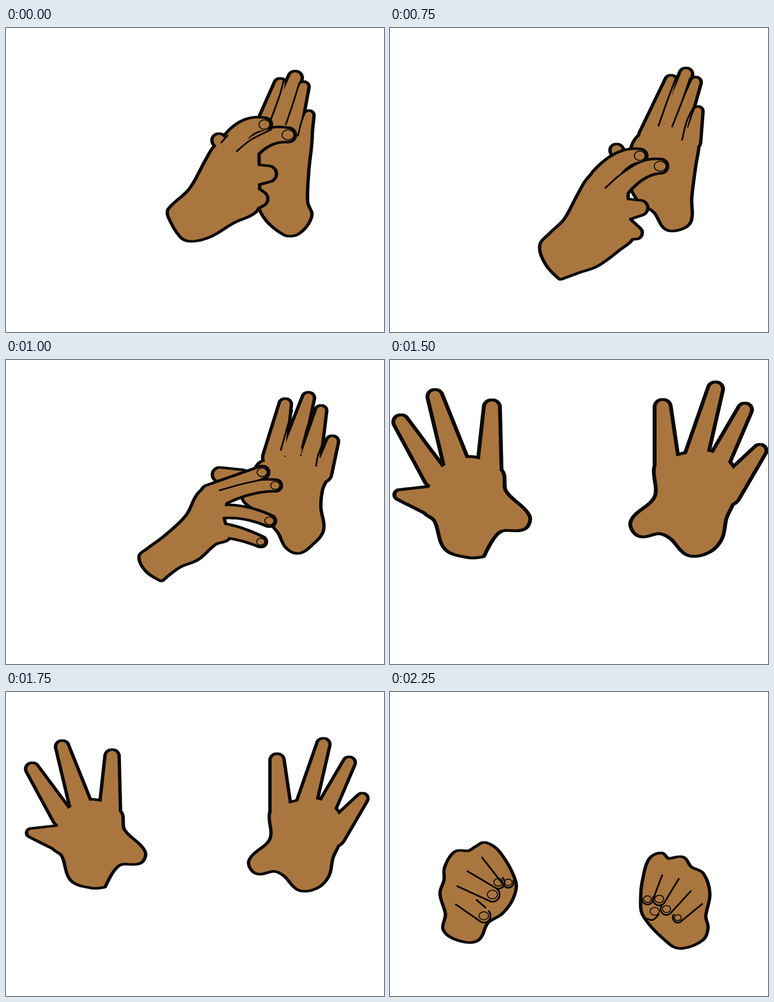
Animation, 834 px wide and 671 px high, one loop 2500 ms. Source, as an HTML page with a canvas:

```html
<!DOCTYPE html>
<html>
<head>
<meta charset="utf-8">
<style>
html, body { margin: 0; width: 100%; height: 100%; overflow: hidden; background: #fff; }
canvas { display: block; }
</style>
</head>
<body>
<canvas id="stage" width="834" height="671"></canvas>
<script>
const ctx = document.getElementById('stage').getContext('2d');
const SKIN = '#aa763f', INK = '#0c0a07', TAU = 2 * Math.PI;

// "x,y x,y!" to points; ! keeps a sharp corner.
const points = text => text.split(' ').map(word => {
  const [x, y] = word.split(',').map(parseFloat);
  return { x, y, sharp: word.endsWith('!') };
});

// Smooth curve through key points, with handles along the neighbours' chord.
function smooth(text, closed) {
  const pts = points(text), n = pts.length, path = new Path2D();
  const at = i => closed ? pts[(i + n) % n] : pts[Math.max(0, Math.min(n - 1, i))];
  const dir = i => {
    const a = at(i - 1), b = at(i + 1), d = Math.hypot(b.x - a.x, b.y - a.y) || 1;
    return at(i).sharp ? [0, 0] : [(b.x - a.x) / d, (b.y - a.y) / d];
  };
  path.moveTo(pts[0].x, pts[0].y);
  for (let i = 0; i < (closed ? n : n - 1); i++) {
    const p = at(i), q = at(i + 1), u = dir(i), v = dir(i + 1);
    const k = Math.hypot(q.x - p.x, q.y - p.y) / 3;
    path.bezierCurveTo(p.x + u[0] * k, p.y + u[1] * k, q.x - v[0] * k, q.y - v[1] * k, q.x, q.y);
  }
  if (closed) path.closePath();
  return path;
}

const skin = path => ({ skin: path });
const line = path => ({ line: path });
const palm = text => skin(smooth(text, true));
const creases = (...texts) => texts.map(text => line(smooth(text)));

function nail(x, y, r) {
  const path = new Path2D();
  path.ellipse(x, y, r, r * 0.85, 0, 0, TAU);
  return { nail: path };
}

// Tapered finger from base to tip, bent towards a middle point if given.
function finger(text, baseR, tipR) {
  const pts = points(text), a = pts[0], b = pts[pts.length - 1];
  const m = pts.length > 2 ? pts[1] : { x: (a.x + b.x) / 2, y: (a.y + b.y) / 2 };
  const path = new Path2D();
  for (let t = 0; t < 1.01; t += 1 / 32) {
    const mix = k => (1 - t) ** 2 * a[k] + 2 * t * (1 - t) * m[k] + t * t * b[k];
    const x = mix('x'), y = mix('y'), r = baseR + (tipR - baseR) * t;
    path.moveTo(x + r, y);
    path.arc(x, y, r, 0, TAU);
  }
  return skin(path);
}

function nailed(text, baseR, tipR) {
  const tip = points(text).pop();
  return [finger(text, baseR, tipR), nail(tip.x, tip.y, tipR)];
}

// Finger folded into a fist: one side line, then a turn round the tip.
function curl(text, r, side) {
  const [a, tip] = points(text), angle = Math.atan2(tip.y - a.y, tip.x - a.x);
  const path = new Path2D();
  path.moveTo(a.x, a.y);
  path.arc(tip.x, tip.y, r, angle + side * TAU / 4, angle - side * TAU / 5, side > 0);
  return [line(path), nail(tip.x, tip.y, r * 0.7)];
}

// Finger folded behind the hand, its tip hooking back to the left.
function hook(text) {
  const { x, y } = points(text).pop();
  const turn = `${x + 8},${y + 10} ${x + 3},${y + 21} ${x - 8},${y + 24} ${x - 22},${y + 23}`;
  return [line(smooth(text + ' ' + turn)), nail(x - 6, y + 11, 8)];
}

const hand = (...parts) => parts.flat();

const tapRight = hand(
  palm('556,215 660,215 672,225 664,320 662,385 671,415 645,451 615,454 565,405 540,300'),
  finger('580,210 605,124', 22, 10), finger('605,200 638,110', 18, 12),
  finger('632,210 656,130', 18, 9), finger('655,240 668,193', 16, 8),
  creases('613,115 604,148 584,203', '648,119 632,170 617,214', '660,184 651,210 644,239')
);
const tapLeft = hand(
  palm('490,245 545,250 555,300 555,375 550,403 500,428 450,458 410,468 388,460 361,415 362,400 408,356 445,290 463,262'),
  finger('480,260 470,248', 12, 12),
  nailed('502,252 530,210 570,213', 22, 12), nailed('530,275 570,230 622,236', 20, 13),
  finger('540,325 578,322', 22, 15), finger('530,375 560,377', 30, 14),
  creases('474,254 490,236', '508,273 540,247 587,223')
);
const slideRight = hand(
  palm('552,238 665,220 679,240 670,310 662,375 661,425 640,442 610,442 585,405 550,380 530,330'),
  finger('574,240 620,117', 22, 10), finger('612,215 653,102', 16, 11),
  finger('640,215 674,120', 16, 9), finger('665,250 679,184', 17, 8),
  creases('630,112 612,160 592,217', '662,110 645,160 622,219', '673,168 655,205 644,248')
);
const slideThumb = hand(finger('500,258 486,234', 13, 11));
const slideLeft = hand(
  palm('425,297 470,262 505,300 508,345 515,395 520,425 490,452 442,487 400,502 362,516! 333,485 320,445 340,420 373,388 402,335'),
  nailed('455,298 495,245 537,246', 24, 12), nailed('490,318 535,268 582,269', 20, 13),
  finger('500,365 537,361', 22, 14), finger('495,405 528,416', 25, 11),
  creases('460,318 490,291 525,267 552,255')
);
const liftRight = hand(
  palm('568,225 690,215 710,245 695,285 691,325 697,375 672,407 645,424 620,412 602,378 560,335 525,305 540,270'),
  finger('592,215 616,98', 22, 10), finger('632,200 667,84', 20, 10),
  finger('672,210 695,112', 20, 9), finger('698,250 720,180', 17, 10),
  creases('632,110 620,150 606,200', '678,113 664,150 652,196', '698,186 688,212 684,235')
);
const liftThumb = hand(finger('520,256 472,253', 11, 13));
const liftLeft = hand(
  palm('430,292 470,278 485,300 478,345 483,370 490,392 460,405 422,438 380,456 343,485! 312,465 297,435 312,420 350,392 400,345'),
  nailed('450,295 565,248', 17, 11), nailed('470,305 535,274 594,277', 15, 10),
  nailed('470,335 525,330 581,355', 12, 10), nailed('470,375 515,380 562,401', 13, 9),
  creases('470,288 520,274 575,262')
);
const partLeft = hand(
  palm('303,163! 330,164 362,170! 392,157 398,168 352,235 346,285 362,308 380,317 380,352 330,368 265,392 228,425! 188,395 185,372 240,328 270,295 268,265 288,260! 277,215! 302,215!'),
  finger('370,335 448,334', 20, 13),
  hook('362,169'), hook('285,210 334,226'), hook('287,258 324,272'), hook('253,311 303,325')
);
const partRight = hand(
  palm('572,230 557,280 535,294 520,325 550,330 590,350 617,365 630,385 642,413 675,403 702,380 708,325 722,285 715,240 670,210 620,208'),
  finger('560,313 464,297', 22, 14), finger('592,225 602,98', 20, 10),
  finger('650,215 687,88', 18, 11), finger('690,225 735,118', 19, 10), finger('710,270 772,199', 20, 9)
);
const openLeft = hand(
  palm('250,265 258,305 303,352 295,375 247,381 216,428! 190,430 146,414 126,360 104,340 112,300 140,256 195,240'),
  finger('118,322 56,311', 25, 7), finger('125,275 58,170', 20, 11),
  finger('165,250 124,121', 21, 11), finger('229,260 234,142', 20, 12)
);
const openRight = hand(
  palm('588,260 586,325 540,372 553,398 592,393 615,403 648,435 685,430 709,405 718,365 735,325 735,272 690,238 630,245'),
  finger('606,260 598,151', 20, 12), finger('660,255 700,116', 19, 11),
  finger('707,255 757,156', 17, 10), finger('722,315 786,235', 24, 9)
);
const fistLeft = hand(
  palm('210,335 240,356 274,420 268,455 245,487 213,508 193,545 160,548 122,526 126,490 114,445 123,415 124,388 145,355 175,353 192,343'),
  curl('202,364 261,420', 12, 1), curl('170,395 239,420', 14, 1),
  curl('147,428 226,447', 16, 1), curl('144,468 207,494', 15, 1), creases('190,458 212,477')
);
const fistRight = hand(
  palm('598,358 613,370 645,367 662,388 688,402 702,445 693,495 698,520 688,545 645,563 620,555 562,493 557,450 562,410 575,370'),
  curl('601,403 568,457', 12, -1), curl('638,411 594,457', 14, -1),
  curl('665,438 610,479', 13, -1), curl('690,467 635,498', 11, -1),
  nail(584,484, 10), creases('565,500 580,503 594,490')
);

function draw(parts, sx = 1, sy = 1, dx = 0, dy = 0) {
  const each = (kind, paint) => parts.forEach(part => part[kind] && paint(part[kind]));
  ctx.setTransform(sx, 0, 0, sy, dx, dy);
  // Broad nib: upright edges come out heavier than level ones.
  ctx.lineWidth = 11;
  for (const shift of [-2, 2]) {
    ctx.translate(shift, 0);
    each('skin', path => ctx.stroke(path));
    ctx.translate(-shift, 0);
  }
  each('skin', path => ctx.fill(path));
  ctx.lineWidth = 3.8;
  each('line', path => ctx.stroke(path));
  ctx.lineWidth = 2.1;
  each('nail', path => ctx.stroke(path));
}

// One pose per quarter second: hands in drawing order, each with scale and shift.
const tap = [[tapRight], [tapLeft]];
const poses = [
  tap, tap,
  [[slideRight], [slideThumb], [slideLeft]],
  [[slideRight], [slideThumb, 1, 1, 14, 36], [slideLeft, 1, 1, 14, 36]],
  [[liftRight], [liftThumb], [liftLeft]],
  [[partRight], [partLeft]],
  [[openLeft, 1.14, 1.14, -42, -57], [openRight, 1.14, 1.14, -80, -68]],
  [[openLeft], [openRight]],
  [[openLeft, 0.8, 0.985, 48, 75], [openRight, 0.8, 0.94, 102, 87]],
  [[fistLeft], [fistRight]]
];

const start = performance.now();
function frame() {
  const time = Math.max(0, performance.now() - start) % 2500;
  ctx.setTransform(1, 0, 0, 1, 0, 0);
  ctx.clearRect(0, 0, 834, 671);
  ctx.fillStyle = SKIN;
  ctx.strokeStyle = INK;
  ctx.lineJoin = 'round';
  poses[Math.floor(time / 250)].forEach(item => draw(...item));
  requestAnimationFrame(frame);
}
frame();
</script>
</body>
</html>
```
